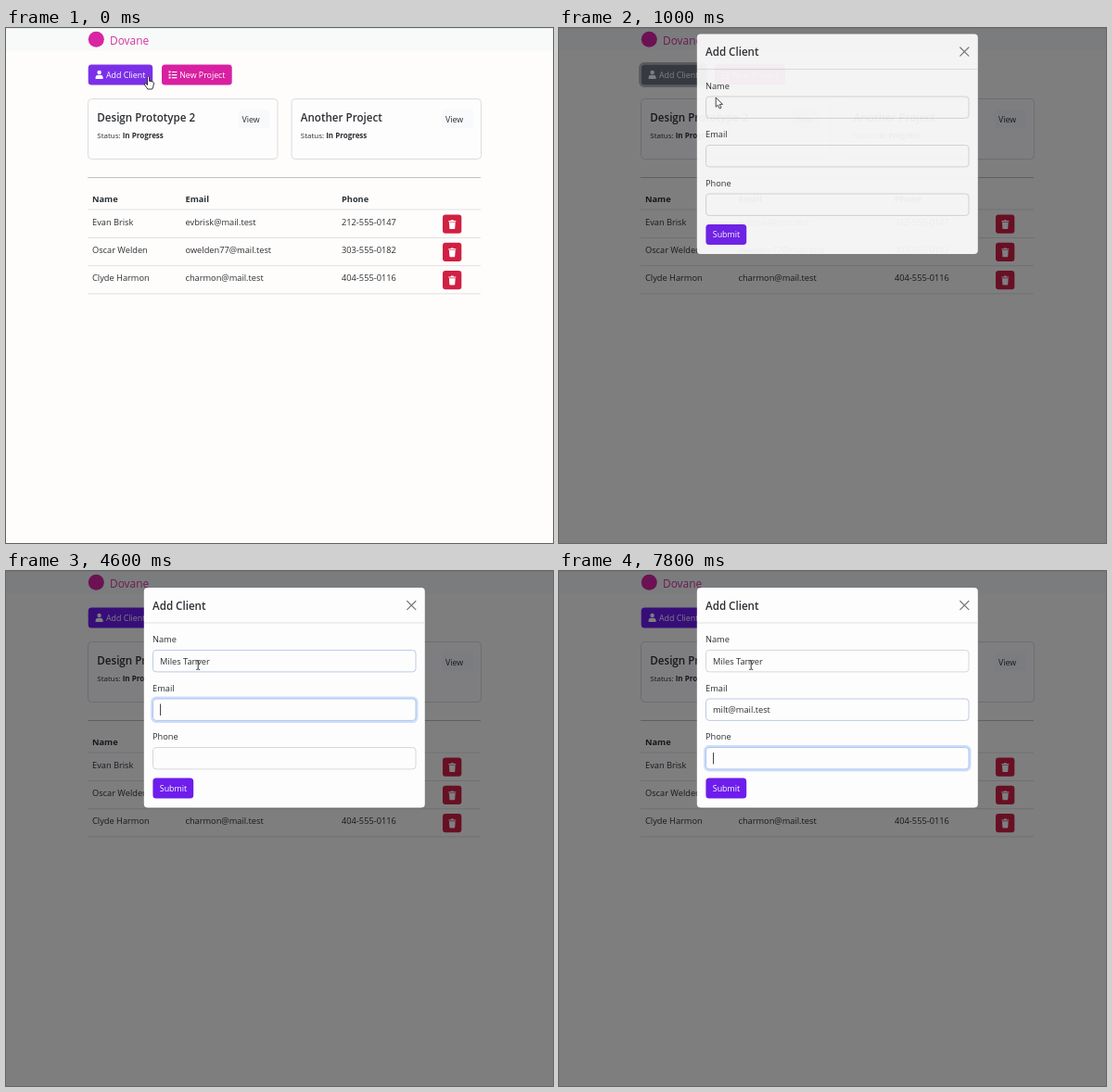
These frames come from a looping animation (590x556 px, 8 s). An HTML page:

```html
<!DOCTYPE html>
<html lang="en">
<head>
<meta charset="utf-8">
<title>Add Client</title>
<style>
  html, body { margin: 0; width: 100%; height: 100%; overflow: hidden; background: #fefdfc; }
  svg { display: block; width: 590px; height: 556px; }
  text { font: 9.25px "Open Sans", "Noto Sans", sans-serif; fill: #2b2f33; white-space: pre; }
  .bold { font-weight: 700; }
  .title { font-size: 11.6px; font-weight: 600; }
  .small { font-size: 8px; }
  .btn { font-size: 8.85px; }
  .light { fill: #fff; }
</style>
</head>
<body>
<svg id="stage" viewBox="0 0 590 556" xmlns="http://www.w3.org/2000/svg"></svg>
<script>
const LOOP = 8000, STEP = 200;
const stage = document.getElementById('stage');

const clients = [
  ['Evan Brisk', 'evbrisk@mail.test', '212-555-0147'],
  ['Oscar Welden', 'owelden77@mail.test', '303-555-0182'],
  ['Clyde Harmon', 'charmon@mail.test', '404-555-0116']
];
const projects = [[88.5, 'Design Prototype 2'], [308, 'Another Project']];

// Form fields: label, top edge, value, time of focus, [time, typed length]
const fields = [
  { label: 'Name', y: 85.5, value: 'Miles Tanver', focus: 1600,
    typing: [[2600, 1], [2800, 2], [3000, 3], [3200, 5], [3600, 6], [3800, 8], [4000, 9], [4200, 11], [4400, 12]] },
  { label: 'Email', y: 138, value: 'milt@mail.test', focus: 4600,
    typing: [[5400, 1], [5600, 2], [5800, 3], [6200, 4], [6400, 5], [6600, 7], [6800, 9], [7000, 11], [7200, 14]] },
  { label: 'Phone', y: 190.5, value: '', focus: 7800, typing: [] }
];
const caretOff = [[2000, 2600], [5000, 5400], [7600, 7800]];

const text = (x, y, str, cls = '') => `<text x="${x}" y="${y}" class="${cls}">${str}</text>`;
const rect = (x, y, w, h, r, attrs) => `<rect x="${x}" y="${y}" width="${w}" height="${h}" rx="${r}" ${attrs}/>`;
const rule = (x1, x2, y, color) => `<path d="M${x1} ${y}H${x2}" stroke="${color}"/>`;

function card([x, name]) {
  return rect(x, 76.5, 204.5, 65, 4, 'fill="#fefdfd" stroke="#dcdcde"') +
    rect(x + 162, 88, 34, 20, 3, 'fill="#f8f9fb"') +
    text(x + 9.8, 100.5, name, 'title') +
    text(x + 9.8, 118.5, 'Status: <tspan class="bold">In Progress</tspan>', 'small') +
    text(x + 166, 101.7, 'View', 'btn');
}

function row([name, email, phone], i) {
  const y = 212.6 + i * 30.1;
  return text(93, y, name) + text(193.5, y, email) + text(362, y, phone) +
    rule(88, 512, 226.5 + i * 30.2, '#dfe1e4') +
    `<g transform="translate(471 ${201.5 + i * 30.2})">
      <rect width="20.3" height="20.3" rx="3" fill="#d12043"/>
      <path fill="#fff" d="M6.3 6.5h2.3l.5-.8h2.4l.5.8h2.3v1.2h-8zM6.9 8.3h6.8l-.5 6.6q0 .6-.6.6h-4.6q-.6 0-.6-.6z"/>
    </g>`;
}

function field(f) {
  return text(158, f.y - 8.5, f.label) +
    rect(157.3, f.y - 1.2, 286, 25.9, 4.5, 'class="ring" fill="none" stroke="#86b4fb" stroke-width="2.4"') +
    rect(158.5, f.y, 283.5, 23.4, 3.5, 'class="box" fill="#fefdfd"') +
    text(166, f.y + 15.3, '', 'value') +
    '<path class="caret" stroke="#222" stroke-width=".9"/>';
}

stage.innerHTML = `
  <rect width="590" height="556" fill="#fefdfc"/>
  <rect width="590" height="24.5" fill="#f8faf9"/>
  ${rule(0, 590, .5, '#e6eeec')}
  <circle cx="97.3" cy="12.3" r="8.5" fill="#d924a3"/>
  <text x="112" y="17.6" style="font-size:11.9px;fill:#d6339f">Dovane</text>
  ${rect(87.4, 38.3, 72, 24.4, 4.5, 'id="addRing" fill="none" stroke="#b4b6ba" stroke-width="2.4"')}
  ${rect(88.7, 39.5, 69.5, 22, 3.5, 'id="add"')}
  <g fill="#fff">
    <circle cx="100.6" cy="47.9" r="2.2"/>
    <path d="M96.6 55v-1.3q0-2.9 2.7-2.9h2.6q2.7 0 2.7 2.9V55z"/>
  </g>
  ${text(108, 53.9, 'Add Client', 'btn light')}
  ${rect(168, 39.5, 75.7, 22, 3.5, 'fill="#d820a1"')}
  <path fill="#fff" d="M175.5 46.6h2v1.7h-2zm0 3.1h2v1.7h-2zm0 3.1h2v1.7h-2zM178.8 46.9h5.6v1.2h-5.6zm0 3.1h5.6v1.2h-5.6zm0 3.1h5.6v1.2h-5.6z"/>
  ${text(187.2, 53.9, 'New Project', 'btn light')}
  ${projects.map(card).join('')}
  ${rule(88, 512, 161.5, '#c2c2c4')}
  ${text(93, 187.6, 'Name', 'bold')}${text(193.5, 187.6, 'Email', 'bold')}${text(362, 187.6, 'Phone', 'bold')}
  ${rule(88, 512, 196, '#dfe1e4')}
  ${clients.map(row).join('')}
  <rect id="dim" width="590" height="556" fill="#010004"/>
  <g id="modal">
    ${rect(148.8, 18, 303, 237.4, 4, 'fill="#fefdfd"')}
    ${text(158, 41.7, 'Add Client', 'title')}
    <path d="M432.7 32.5l9.2 9.2m0-9.2l-9.2 9.2" stroke="#77777a" stroke-width="1.2" stroke-linecap="round"/>
    ${rule(149, 451.5, 56, '#dfe1e4')}
    ${fields.map(f => `<g class="field">${field(f)}</g>`).join('')}
    ${rect(158.4, 223.5, 43.8, 22, 3.5, 'fill="#6e1ded"')}
    ${text(165.8, 237.9, 'Submit', 'btn light')}
  </g>
  <g id="pointer">
    <path data-kind="hand" d="M-1 1q1-1.4 2 0v4.2l4 .9q1.2.4 1 1.8l-.9 4.1-.9 2H-.6l-3.6-5q-.3-1.5 1.2-1.2L-1 9.5z"
      fill="#fff" stroke="#222" stroke-width=".9" stroke-linejoin="round"/>
    <path data-kind="arrow" d="M0 0v10.2l2.3-2.1 1.7 3.8 1.8-.8-1.7-3.7h3.2z" fill="#fff" stroke="#333" stroke-width=".9"/>
    <path data-kind="beam" d="M-2-4.5Q0-4.5 0-3.5 0-4.5 2-4.5M0-3.5v8M-2 5.5Q0 5.5 0 4.5 0 5.5 2 5.5" fill="none" stroke="#222" stroke-width=".9"/>
  </g>`;

const $ = id => document.getElementById(id);
const all = sel => [...stage.querySelectorAll(sel)];
const set = (el, attrs) => { for (const k in attrs) el.setAttribute(k, attrs[k]); };
const clamp = v => Math.max(0, Math.min(1, v));
const lerp = (a, b, p) => a + (b - a) * p;
const mix = (a, b, p) => `rgb(${a.map((v, i) => Math.round(lerp(v, b[i], p)))})`;

const fieldParts = all('.field').map(g => ({
  ring: g.querySelector('.ring'), box: g.querySelector('.box'),
  value: g.querySelector('.value'), caret: g.querySelector('.caret')
}));
const pointers = all('[data-kind]');

function drawPage(t) {
  $('dim').setAttribute('opacity', .5 * clamp((t - 570) / 400));
  const focused = t >= 800 && t < 1600;
  const fill = t < 800 ? '#7b30e8' : t < 1000 ? '#5c38ae' : focused ? '#6c757d' : '#6e1ded';
  $('add').setAttribute('fill', fill);
  $('addRing').setAttribute('opacity', focused ? 1 : 0);
}

function drawModal(t) {
  set($('modal'), {
    opacity: t < 1000 ? 0 : t < 1200 ? .93 : 1,
    transform: `translate(0 ${-11.5 * clamp((1200 - t) / 200)})`
  });
  fields.forEach((f, i) => {
    const { ring, box, value, caret } = fieldParts[i];
    const end = fields[i + 1] ? fields[i + 1].focus : LOOP;
    const active = t >= f.focus && t < end;
    const gain = active ? (t < f.focus + STEP ? .6 : 1) : 0;
    const fade = t === end ? .4 : 0;
    ring.setAttribute('opacity', gain * .7);
    box.setAttribute('stroke', mix([214, 215, 220], [150, 184, 245], Math.max(gain, fade)));

    const count = f.typing.reduce((n, [at, len]) => t >= at ? len : n, 0);
    value.textContent = f.value.slice(0, count);
    const x = 166.6 + (count ? value.getComputedTextLength() : 0);
    const hidden = caretOff.some(([a, b]) => t >= a && t < b);
    set(caret, { d: `M${x} ${f.y + 5.5}v12.5`, opacity: active && !hidden ? 1 : 0 });
  });
}

function drawPointer(t) {
  const kind = t < 800 ? 'hand' : t < 1200 ? 'arrow' : 'beam';
  const p = kind === 'hand' ? clamp((t - 200) / 400) : clamp((t - 1000) / 400);
  const [x, y] = kind === 'hand' ? [lerp(153.5, 149.5, p), 52]
    : t < 1000 ? [149.5, 52]
    : [lerp(169.2, 207.2, p), lerp(75, 101, p)];
  $('pointer').setAttribute('transform', `translate(${x} ${y})`);
  pointers.forEach(el => el.setAttribute('opacity', el.dataset.kind === kind ? 1 : 0));
}

function render(ms) {
  const t = Math.floor((ms % LOOP) / STEP) * STEP;
  drawPage(t);
  drawModal(t);
  drawPointer(t);
}

const start = performance.now();
function tick() {
  render(performance.now() - start);
  requestAnimationFrame(tick);
}
tick();
</script>
</body>
</html>
```
